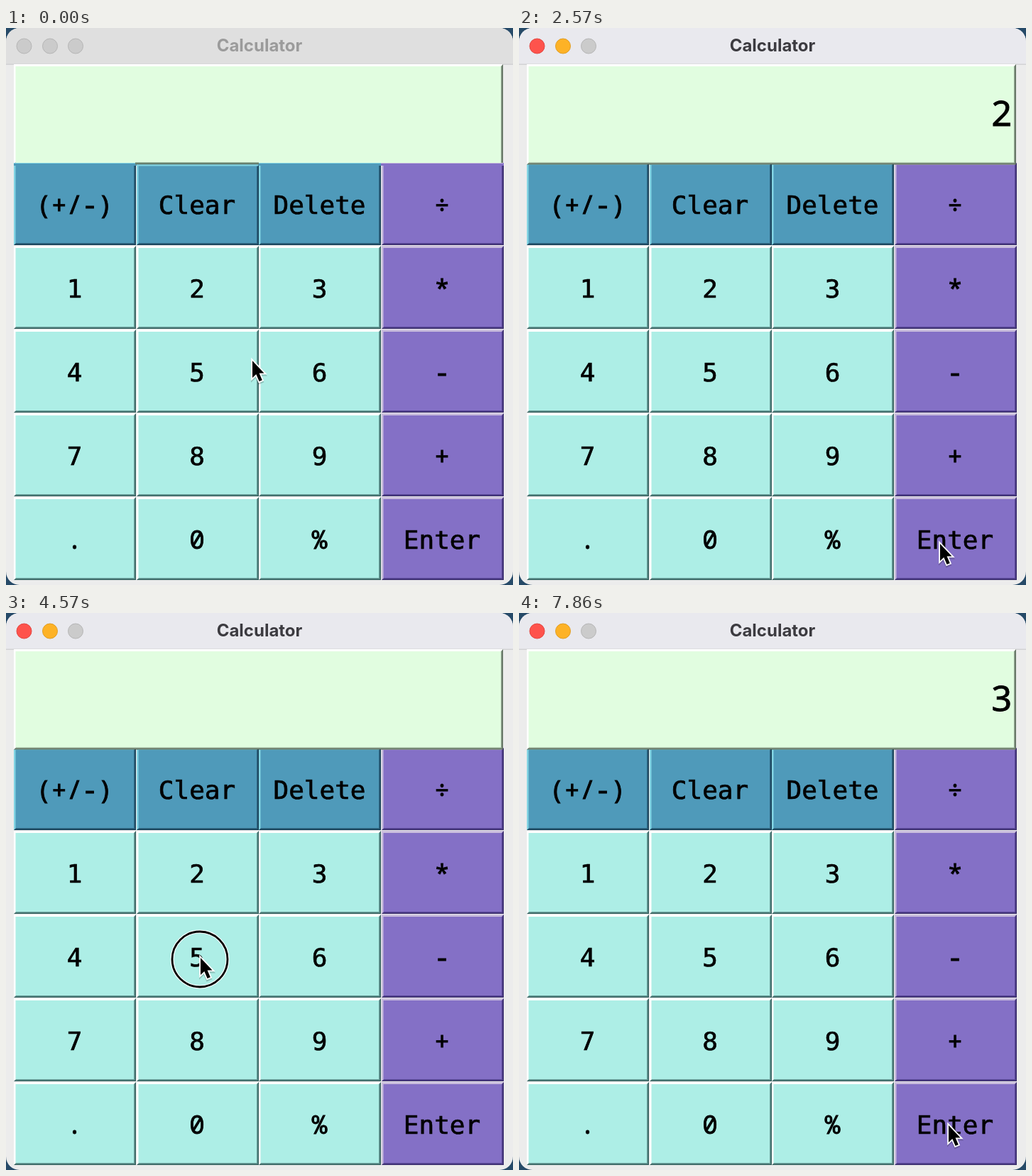
Recreate the animation shown at these times as an HTML page. Size 714 px wide and 785 px high, loop 8000 ms.

```html
<!DOCTYPE html>
<html lang="en">
<head>
<meta charset="utf-8">
<title>Calculator</title>
<style>
html, body { margin: 0; width: 100%; height: 100%; overflow: hidden; background: #264a68; }
svg { display: block; width: 714px; height: 785px; }
text { text-anchor: middle; }
.key { font: 36px "DejaVu Sans Mono", monospace; stroke: #000; stroke-width: 0.7px; }
.sign { font-family: "Noto Sans Mono", monospace; stroke-width: 0.9px; }
.value { font: 50px "Noto Sans", "Open Sans", sans-serif; text-anchor: end; letter-spacing: -1.5px; stroke: #000; stroke-width: 0.9px; }
.title { font: 700 24px Inter, sans-serif; }
</style>
</head>
<body>
<svg id="stage" viewBox="0 0 714 785"></svg>
<script>
const stage = document.getElementById('stage');

function add(tag, attrs, parent = stage) {
  const el = document.createElementNS('http://www.w3.org/2000/svg', tag);
  for (const name in attrs) el.setAttribute(name, attrs[name]);
  return parent.appendChild(el);
}

function label(str, x, y, cls) {
  const el = add('text', { x, y, class: cls });
  el.textContent = str;
  return el;
}

function rect(x, y, width, height, fill, parent) {
  add('rect', { x, y, width, height, fill }, parent);
}

// Raised panel: light top and left, dark bottom and right, mitred corners.
function bevel(x, y, r, b, [face, light, dark, edge], parent = stage) {
  const n = 3;
  rect(x, y, r - x, b - y, edge, parent);
  rect(x, y, r - x - 1.5, b - y - 1.5, dark, parent);
  add('path', { fill: light, d: `M${x} ${y}H${r}l${-n} ${n}H${x + n}V${b - n}l${-n} ${n}z` }, parent);
  rect(x + 2.5, y + n, r - x - n - 2.5, b - y - 2 * n, face, parent);
}

const mint = ['#adeee6', '#ffffff', '#679b97', '#36615f'];
const blue = ['#4f9aba', '#83d5e4', '#2f6682', '#173f55'];
const violet = ['#8470c6', '#c9bddd', '#574695', '#3a2d6c'];
const green = ['#e1fde0', '#ffffff', '#8b9f8b', '#5f6f5f'];

add('rect', { width: 714, height: 785, rx: 19, fill: '#ececec' });
const bar = add('path', { d: 'M0 51V19A19 19 0 0 1 19 0H695A19 19 0 0 1 714 19V51z' });
rect(0, 50.5, 714, 1.5, '#d2d2d4');
const lights = [25.5, 62, 98].map(cx => add('circle', { cx, cy: 25.5, r: 10.5 }));
const title = label('Calculator', 357, 33, 'title');

const rows = [
  ['(+/-)', 'Clear', 'Delete', '÷'],
  ['1', '2', '3', '*'],
  ['4', '5', '6', '-'],
  ['7', '8', '9', '+'],
  ['.', '0', '%', 'Enter']
];
rows.forEach((row, j) => row.forEach((name, i) => {
  const x = 11 + i * 172.5, y = j ? 188.5 + j * 118 : 190;
  bevel(Math.round(x), Math.round(y), Math.round(x + 172), Math.round(306 + j * 118),
    i === 3 ? violet : j ? mint : blue);
  label(name, 96.5 + i * 172.5, 262 + j * 118, /^\W|0/.test(name) ? 'key sign' : 'key');
}));

const idle = add('g', {});
bevel(11, 51, 700, 192, green, idle);
rect(14, 187, 683, 3, green[0], idle);
rect(11, 190, 517, 4, blue[0], idle);
rect(528, 190, 173, 4, violet[0], idle);
rect(11, 190, 517, 1, blue[1], idle);
rect(528, 190, 172, 1, violet[1], idle);
rect(182, 189.5, 174, 3, '#66806f', idle);
rect(184, 192.5, 171, 2, blue[1], idle);

const active = add('g', {});
bevel(11, 51, 700, 192.5, green, active);
const value = label('', 692.5, 138, 'value');

const ring = add('g', { fill: 'none' });
add('circle', { r: 39, stroke: '#fff', 'stroke-width': 5 }, ring);
add('circle', { r: 39, stroke: '#000', 'stroke-width': 2.8 }, ring);

const pointer = add('g', {});
const arrow = 'M1 1V25L6.3 20L10.6 30L14.8 28.2L10.6 18.4H17.5z';
add('path', { d: arrow, fill: '#000', stroke: '#000', 'stroke-width': 4, opacity: 0.18, transform: 'translate(0 2)' }, pointer);
add('path', { d: arrow, fill: '#000', stroke: '#fff', 'stroke-width': 3.6, 'paint-order': 'stroke' }, pointer);

const STEP = 1000 / 7, LOOP = 8000;
// step, x, y of the pointer tip
const path = [
  [0, 346, 468], [1, 340, 460], [4, 277, 372], [7, 276, 370], [8, 290, 365],
  [10, 612, 251], [12, 612, 250], [14, 274, 371], [16, 276, 374],
  [18, 592, 726], [20, 594, 724], [25, 272, 250], [27, 271, 246], [28, 271, 248],
  [31, 272, 486], [33, 274, 484], [36, 632, 366], [37, 640, 364], [39, 638, 364],
  [44, 440, 370], [46, 433, 367], [48, 434, 368],
  [51, 603, 719], [53, 604, 720], [55, 604, 721]
];
const presses = [6, 11, 15, 19, 27, 32, 38, 47];
const values = [[0, ''], [7, '2'], [12, ''], [16, '2'], [20, '1.0'], [28, ''], [33, '5'], [39, ''], [48, '3']];
const FOCUS = 5, FIRST = 7;

function tipAt(s) {
  const k = path.findIndex(p => p[0] >= s);
  if (k < 1) return path[0].slice(1);
  const [a, ax, ay] = path[k - 1], [b, bx, by] = path[k];
  const u = (s - a) / (b - a), e = u * u * (3 - 2 * u);
  return [ax + (bx - ax) * e, ay + (by - ay) * e];
}

function draw(ms) {
  const s = Math.min(55, Math.floor((ms % LOOP + 5) / STEP));
  const focused = s >= FOCUS;
  bar.setAttribute('fill', focused ? '#e9e9ee' : '#dfdfdf');
  title.setAttribute('fill', focused ? '#3c3b40' : '#9b9b9b');
  lights.forEach((el, i) => {
    const on = focused && i < 2;
    el.setAttribute('fill', on ? ['#fe534c', '#fdb226'][i] : '#cbcbcb');
    el.setAttribute('stroke', on ? ['#e2443f', '#e09c20'][i] : '#b5b5b5');
  });
  idle.style.display = s < FIRST ? '' : 'none';
  active.style.display = s < FIRST ? 'none' : '';
  value.textContent = values.filter(v => v[0] <= s).pop()[1];
  const [x, y] = tipAt(s);
  pointer.setAttribute('transform', `translate(${x} ${y})`);
  ring.setAttribute('transform', `translate(${x} ${y + 3})`);
  ring.style.display = presses.includes(s) ? '' : 'none';
}

let start;
function frame(now) {
  start ??= now;
  draw(now - start);
  requestAnimationFrame(frame);
}
draw(0);
requestAnimationFrame(frame);
</script>
</body>
</html>
```
